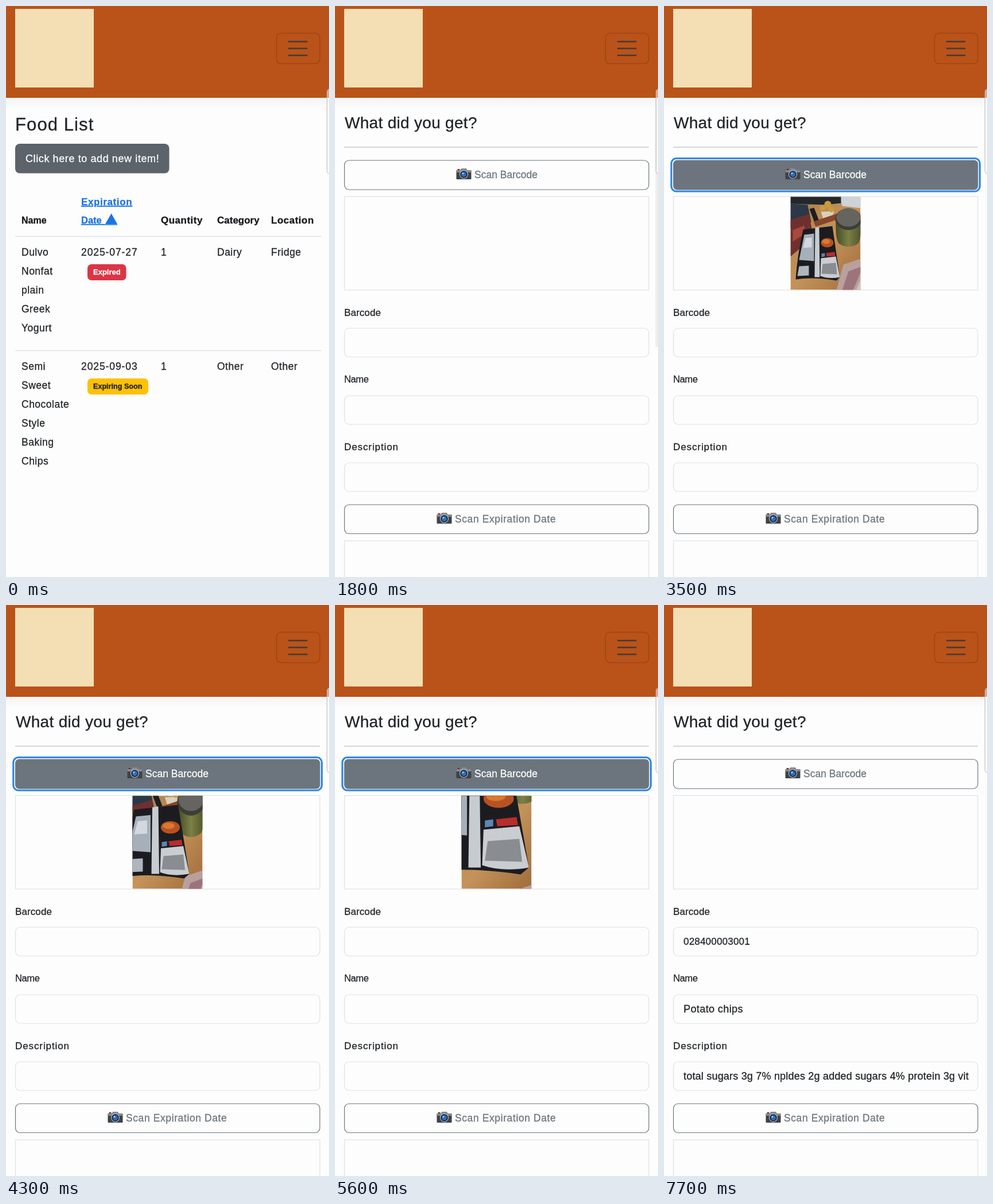
Animation of 563x995 px, one loop 7800 ms. Source, as an HTML page:

```html
<!DOCTYPE html>
<html lang="en">
<head>
<meta charset="utf-8">
<title>Food list</title>
<style>
  html, body { margin: 0; width: 100%; height: 100%; overflow: hidden; background: #fdfdfd; }
  svg { display: block; width: 563px; height: 995px; }
  text { font-family: "Liberation Sans", Arial, sans-serif; white-space: pre; }
</style>
</head>
<body>
<svg id="stage" viewBox="0 0 563 995">
  <defs>
    <linearGradient id="shade" x2="0" y2="1">
      <stop offset="0" stop-color="#000" stop-opacity=".035"/>
      <stop offset="1" stop-color="#000" stop-opacity="0"/>
    </linearGradient>
    <linearGradient id="wood" x2="1" y2="1">
      <stop offset="0" stop-color="#a77a4c"/>
      <stop offset=".5" stop-color="#c4935a"/>
      <stop offset="1" stop-color="#a06c3b"/>
    </linearGradient>
    <linearGradient id="glass" x2="1">
      <stop offset="0" stop-color="#454a25"/>
      <stop offset=".5" stop-color="#7b8144"/>
      <stop offset="1" stop-color="#4f532c"/>
    </linearGradient>
    <clipPath id="view"><rect width="122" height="162"/></clipPath>
    <g id="camera">
      <path d="M1 4h6l2-3h8l2 3h6q1 0 1 1v14q0 1-1 1H1q-1 0-1-1V5q0-1 1-1z" fill="#3f4247"/>
      <path d="M1 4h6l2-3h8l2 3h6q1 0 1 1v3H0V5q0-1 1-1z" fill="#85898f"/>
      <rect x="2" y="2" width="4" height="2" fill="#6b2f2f"/>
      <circle cx="13" cy="11.5" r="7.5" fill="#c9cdd2"/>
      <circle cx="13" cy="11.5" r="6.5" fill="#1c2f4c"/>
      <circle cx="13" cy="11.5" r="4.4" fill="#2f6fb8"/>
      <circle cx="11.5" cy="9.8" r="1.4" fill="#b8d8f5"/>
    </g>
  </defs>
  <g id="list"></g>
  <g id="form">
    <g id="formBase"></g>
    <g id="idle"></g>
    <g id="active"></g>
    <g id="photo" transform="translate(220.5 332.5)" clip-path="url(#view)">
      <rect width="122" height="162" fill="url(#wood)"/>
      <g id="desk">
        <path d="M84-5H124V20L90 16z" fill="#cdd3d6"/>
        <path d="M0-5H88V11L60 14 0 12z" fill="#23272c"/>
        <path d="M0 12L30 14 36 44 0 54z" fill="#2b3848"/>
        <path d="M0 40L32 30 40 70 0 104z" fill="#6d302f"/>
        <path d="M4 58L24 50 26 64 4 78z" fill="#a8493a"/>
        <path d="M33 21L41 19 50 42 42 45z" fill="#1d1e20"/>
        <path d="M53 26L76 25 72 38 57 38z" fill="#d8d0bd"/>
        <g fill="#c99a3c">
          <circle cx="56" cy="19" r="5"/><circle cx="65" cy="13" r="6"/><circle cx="71" cy="22" r="5"/>
        </g>
        <path d="M40 43L82 29 86 38 44 52z" fill="#874529"/>
      </g>
      <g id="rug">
        <path d="M80 163L92 118 122 108V163z" fill="#b8a09d"/>
        <path d="M90 163L101 130 122 122V132L109 163z" fill="#9c747b"/>
        <path d="M114 163L122 145V163z" fill="#d2c2b8"/>
      </g>
      <g id="jar">
        <path d="M-22-10Q-23 26-16 32Q0 42 16 32Q23 26 22-10z" fill="url(#glass)"/>
        <ellipse cy="-11" rx="23" ry="19" fill="#3c3d38"/>
        <ellipse cy="-14" rx="21" ry="16" fill="#65645e"/>
      </g>
      <g id="bag">
        <path d="M-40-23L11-29Q17 12 24 60L18 66Q-20 59-53 64Q-50 20-40-23z" fill="#1c1c20"/>
        <path d="M-38-14L-21-16-21 32-47 30z" fill="#a6b0bb"/>
        <path d="M-36-8L-25-9-25 8-40 9z" fill="#d2d8de"/>
        <path d="M-19-26L-12-27-11 60-20 60z" fill="#c7ccd1"/>
        <path d="M-47 41L-30 40-30 57-50 58z" fill="#aeb5bc"/>
        <ellipse cx="2" cy="0" rx="11" ry="8" fill="#b85222"/>
        <ellipse cx="0" cy="-2" rx="7" ry="4" fill="#d97930"/>
        <path d="M0 18L15 16 16 23 1 24z" fill="#b92d2c"/>
        <path d="M-8 19L-2 18-2 24-8 25z" fill="#5c86b4"/>
        <path d="M-9 27L17 24 24 60Q5 64-10 58z" fill="#c9ccd0"/>
        <path d="M-6 37L17 35 19 55-8 54z" fill="#898c90"/>
      </g>
    </g>
    <g id="barcode"></g>
    <g id="details"></g>
  </g>
  <g id="nav"></g>
  <rect id="track" x="558.5" y="160" width="5" height="434" fill="#eeeeee"/>
  <rect x="559.5" y="144.5" width="12" height="148" rx="5" fill="#fff" fill-opacity=".5" stroke="#b6b4b3"/>
</svg>
<script>
const LOOP = 7800, STEP = 100;
const FORM_AT = 1200, PRESS_AT = 2700, VIDEO_AT = 3100, SCANNED_AT = 5800, DETAILS_AT = 6900;
const INK = '#202428', GREY = '#6c757d', LINE = '#dee2e6';

const el = id => document.getElementById(id);
const text = (x, y, s, size = 17.5, gap = .5, fill = INK, extra = '') =>
  `<text x="${x}" y="${y}" font-size="${size}" letter-spacing="${gap}" fill="${fill}"
    stroke="${fill}" stroke-width=".3" ${extra}>${s}</text>`;
const box = (x, y, w, h, r, fill, stroke = 'none', width = 1) =>
  `<rect x="${x}" y="${y}" width="${w}" height="${h}" rx="${r}" fill="${fill}" stroke="${stroke}" stroke-width="${width}"/>`;
const rule = (x1, x2, y, color, width = 1) =>
  `<path d="M${x1} ${y}H${x2}" stroke="${color}" stroke-width="${width}"/>`;
const camera = (x, y) => `<use href="#camera" x="${x}" y="${y}"/>`;
const field = y => box(16.5, y, 530.5, 50, 8, '#fdfdfd', LINE, 1.2);

const BOLD = 'font-weight="700"';
const head = (x, y, s, size = 17, gap = 0) => text(x, y, s, size, gap, '#17191c', BOLD);
const link = (y, s, size, gap) =>
  text(131, y, s, size, gap, '#1a73e8', BOLD + ' text-decoration="underline"');

function row(y, name, date, category, place) {
  return name.split(' ').map((word, i) => text(27, y + i * 32.9, word)).join('')
    + text(131, y, date, 17.5, .9) + text(270, y, '1')
    + text(368, y, category) + text(462, y, place);
}

el('nav').innerHTML =
  '<rect y="160" width="563" height="20" fill="url(#shade)"/>'
  + box(0, 0, 563, 160, 0, '#b95319')
  + box(16, 5, 137, 137, 0, '#f3dfb3')
  + box(471.5, 47.5, 75.5, 53, 8, 'none', '#9f4414', 1.5)
  + [62, 74, 86].map(y => rule(492, 525.5, y, '#453936', 2.6)).join('');

el('list').innerHTML =
  text(16, 217, 'Food List', 31, 1.1)
  + box(16, 240, 268.5, 51.5, 8, '#5c636a')
  + text(34, 271.5, 'Click here to add new item!', 18, .6, '#fff')
  + head(27, 379, 'Name', 16)
  + link(347, 'Expiration', 17, .6) + link(379, 'Date ', 16.5, 0)
  + '<path d="M173 380L183.5 361.5 194 380z" fill="#1a73e8"/>' + rule(170, 194, 381, '#1a73e8', 1.5)
  + head(270, 379, 'Quantity', 17, .5) + head(368, 379, 'Category') + head(462, 379, 'Location', 17, .5)
  + rule(16, 550, 401.5, LINE, 1.3)
  + row(435, 'Dulvo Nonfat plain Greek Yogurt', '2025-07-27', 'Dairy', 'Fridge')
  + box(142, 450, 67.5, 28, 7, '#dc3545') + text(152, 468, 'Expired', 13, 0, '#fff', BOLD)
  + rule(16, 550, 600.5, LINE, 1.3)
  + row(634, 'Semi Sweet Chocolate Style Baking Chips', '2025-09-03', 'Other', 'Other')
  + box(142, 649, 106, 28, 7, '#ffc107') + text(152, 667, 'Expiring Soon', 12.6, 0, INK, BOLD);

el('formBase').innerHTML =
  text(17, 213, 'What did you get?', 28, .3)
  + rule(16, 547, 246, '#c9cacb', 1.3)
  + box(16.5, 332, 530.5, 163, 0, '#fdfdfd', LINE, 1.2)
  + text(16, 540, 'Barcode', 17, .1) + field(561.5)
  + text(16, 656, 'Name', 16.5, -.4) + field(679)
  + text(16, 774, 'Description', 17, .9) + field(796)
  + box(16.5, 869, 530.5, 50.5, 8, '#fdfdfd', GREY, 1.2)
  + camera(177.5, 882) + text(209, 900, 'Scan Expiration Date', 17.5, .6, GREY)
  + box(16.5, 932, 530.5, 163, 0, '#fdfdfd', LINE, 1.2);

const scanLabel = color => camera(211.5, 282) + text(243, 300, 'Scan Barcode', 17.5, 0, color);
el('idle').innerHTML = box(16.5, 269, 530.5, 51, 8, '#fdfdfd', GREY, 1.2) + scanLabel(GREY);
el('active').innerHTML =
  box(12.8, 265.5, 537.7, 57.5, 9, '#fdfdfd', '#2f87e2', 3.2)
  + box(16, 268.5, 531.5, 52, 7, GREY) + scanLabel('#fff');

el('barcode').innerHTML = text(34, 592, '028400003001', 17, .2);
el('details').innerHTML = text(34, 710, 'Potato chips', 18, .4)
  + text(34, 827, 'total sugars 3g 7% npldes 2g added sugars 4% protein 3g vit', 18, .2);

// Camera poses: x, y, scale x, scale y for each pose time
const POSE_TIMES = [3500, 4300, 5200];
const POSES = {
  desk: [[0, 0, 1, 1], [-2, -26, 1.1, 1.1], [-20, -90, 1.4, 1.4]],
  rug: [[0, 0, 1, 1], [0, 22, 1, 1], [10, 44, 1, 1]],
  jar: [[101, 50, 1, 1], [102, 24, 1.05, 1.3], [106, -34, 1.3, 1.3]],
  bag: [[62, 80, 1, 1], [63, 55, 1.5, 1.35], [60, 5, 2.4, 2]]
};

function movePhoto(t) {
  const i = t < POSE_TIMES[1] ? 0 : 1;
  const u = (t - POSE_TIMES[i]) / (POSE_TIMES[i + 1] - POSE_TIMES[i]);
  const k = Math.max(0, Math.min(1, u));
  for (const [id, poses] of Object.entries(POSES)) {
    const [x, y, sx, sy] = poses[i].map((v, n) => v + (poses[i + 1][n] - v) * k);
    el(id).setAttribute('transform', `translate(${x} ${y}) scale(${sx} ${sy})`);
  }
}

function show(id, on) {
  el(id).style.display = on ? '' : 'none';
}

function render(ms) {
  const t = Math.floor((ms % LOOP) / STEP) * STEP;
  const within = (from, to = LOOP) => t >= from && t < to;
  const scanning = within(PRESS_AT, SCANNED_AT);
  show('list', t < FORM_AT);
  show('form', within(FORM_AT));
  show('track', within(FORM_AT, 2000));
  show('idle', !scanning);
  show('active', scanning);
  show('photo', within(VIDEO_AT, SCANNED_AT));
  show('barcode', within(SCANNED_AT));
  show('details', within(DETAILS_AT));
  movePhoto(t);
}

const start = performance.now();
function tick() {
  render(performance.now() - start);
  requestAnimationFrame(tick);
}
tick();
</script>
</body>
</html>
```
